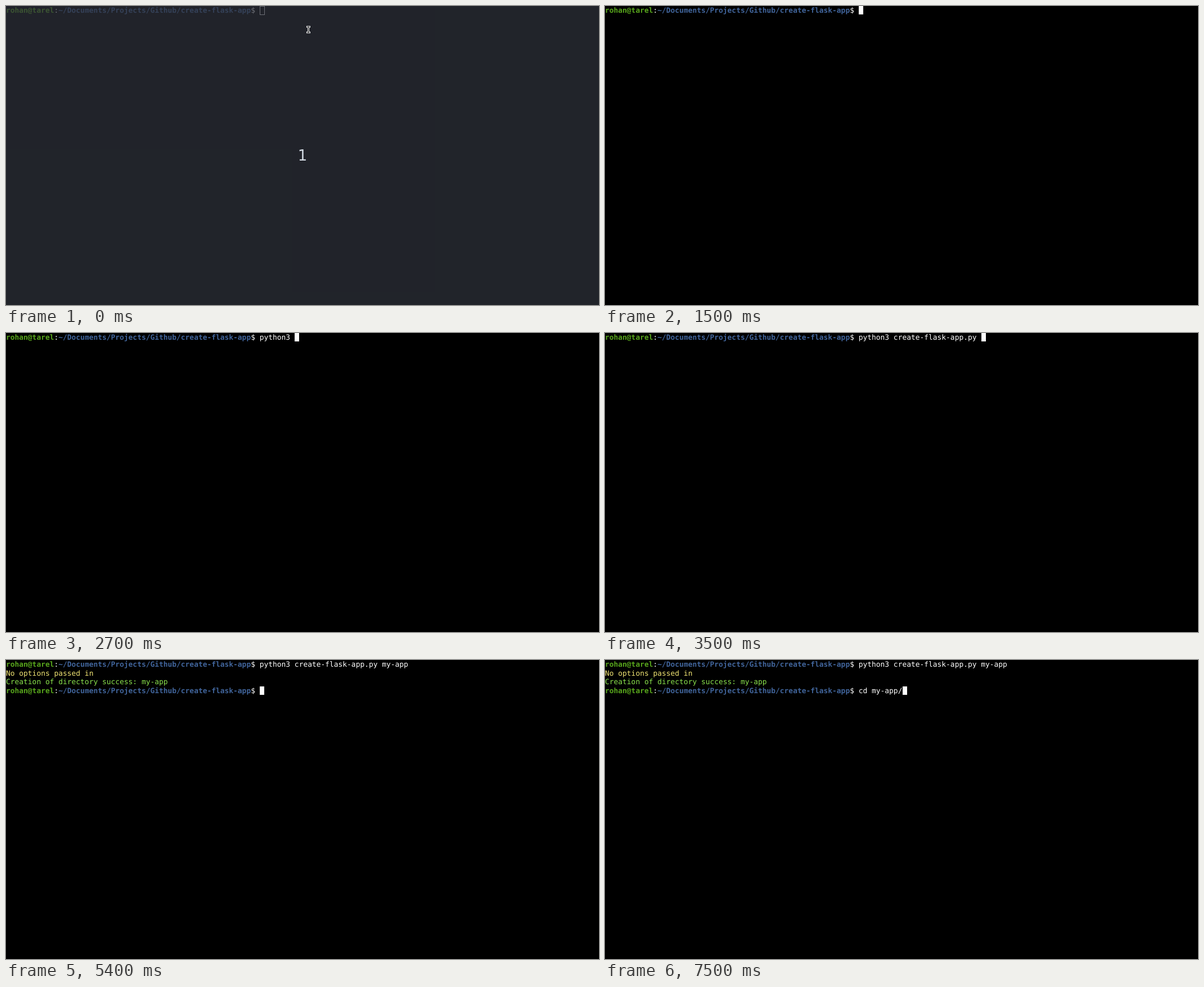
An HTML page that plays this animation: 1054x532 px, repeating every 8000 ms.

```html
<!DOCTYPE html>
<html lang="en">
<head>
<meta charset="utf-8">
<title>Terminal session</title>
<style>
  html, body { margin: 0; width: 100%; height: 100%; overflow: hidden; background: #000; }
  #stage { position: relative; width: 1054px; height: 532px; overflow: hidden; background: #000; }
  .row {
    position: absolute; left: 0; margin: 0; white-space: pre; color: #fff;
    font: 12.92px/15.66px "DejaVu Sans Mono", monospace;
    text-rendering: geometricPrecision;
  }
  .user { color: #58a61c; font-weight: bold; }
  .path { color: #41659c; font-weight: bold; }
  .note { color: #f0e473; }
  .done { color: #8ae24c; }
  #cursor { position: absolute; width: 8px; height: 15px; background: #fff; }
  #cursor.hollow {
    box-sizing: border-box; width: 9px; height: 16px;
    background: none; border: 1px solid #fff;
  }
  #count {
    position: absolute; inset: 0; background: rgba(47, 51, 60, .7); color: #d3dae3;
    font: 26px/532px "DejaVu Sans", sans-serif; text-align: center;
  }
  #mouse { position: absolute; left: 533px; top: 35px; }
</style>
</head>
<body>
<div id="stage">
  <div class="row"></div>
  <div class="row note"></div>
  <div class="row done"></div>
  <div class="row"></div>
  <div id="cursor"></div>
  <div id="count">1</div>
  <svg id="mouse" width="9" height="14">
    <path d="M1 .5H8V3.5H6V10.5H8V13.5H1V10.5H3V3.5H1Z" fill="#fff"/>
    <path d="M2 2H7M2 12H7M4.5 2V12" fill="none" stroke="#000"/>
  </svg>
</div>
<script>
  const LOOP = 8000, CELL = 7.778, LINE = 15.66, TEXT_TOP = 1, PROMPT_COLS = 58;
  const PROMPT = '<span class="user">rohan@tarel</span>:' +
    '<span class="path">~/Documents/Projects/Github/create-flask-app</span>$ ';

  // Each command: its row, its text and [time, characters typed] pairs.
  const commands = [
    { row: 0, start: 0, text: 'python3 create-flask-app.py my-app', keys: [
      [1700, 1], [1800, 2], [1900, 3], [2000, 4], [2200, 5], [2300, 6], [2500, 7],
      [2700, 8], [3000, 9], [3200, 11], [3500, 28], [4000, 29], [4300, 30],
      [4500, 31], [4600, 32], [4700, 33], [5000, 34]] },
    { row: 3, start: 5400, text: 'cd my-app/', keys: [
      [6400, 2], [6700, 3], [7000, 4], [7400, 5], [7500, 10]] }
  ];
  const FOCUS = 400, MOUSE_OFF = 1500, ENTER = 5300, OUTPUT = 5400;
  const blinks = [[1000, 1500], [5900, 6300]];

  const $ = id => document.getElementById(id);
  const rows = [...document.querySelectorAll('.row')];
  const cursor = $('cursor'), count = $('count'), mouse = $('mouse');
  rows.forEach((el, i) => el.style.top = i * LINE + TEXT_TOP + 'px');

  const show = (el, on) => el.style.visibility = on ? 'visible' : 'hidden';
  const typed = (keys, t) => keys.reduce((n, [at, len]) => t >= at ? len : n, 0);

  function place(row, col) {
    cursor.style.left = Math.round(col * CELL) + 'px';
    cursor.style.top = Math.round(row * LINE) + 'px';
  }

  function draw(t) {
    for (const { row, start, text, keys } of commands) {
      const n = typed(keys, t);
      rows[row].innerHTML = t >= start ? PROMPT + text.slice(0, n) : '';
      if (t >= start) place(row, PROMPT_COLS + n);
    }
    if (t >= ENTER && t < OUTPUT) place(1, 0);
    rows[1].textContent = t >= OUTPUT ? 'No options passed in' : '';
    rows[2].textContent = t >= OUTPUT ? 'Creation of directory success: my-app' : '';
    cursor.className = t < FOCUS ? 'hollow' : '';
    show(cursor, !blinks.some(([a, b]) => t >= a && t < b));
    show(count, t < FOCUS);
    show(mouse, t < MOUSE_OFF);
  }

  const origin = performance.now();
  function tick() {
    draw((performance.now() - origin) % LOOP);
    requestAnimationFrame(tick);
  }
  draw(0);
  requestAnimationFrame(tick);
</script>
</body>
</html>
```
